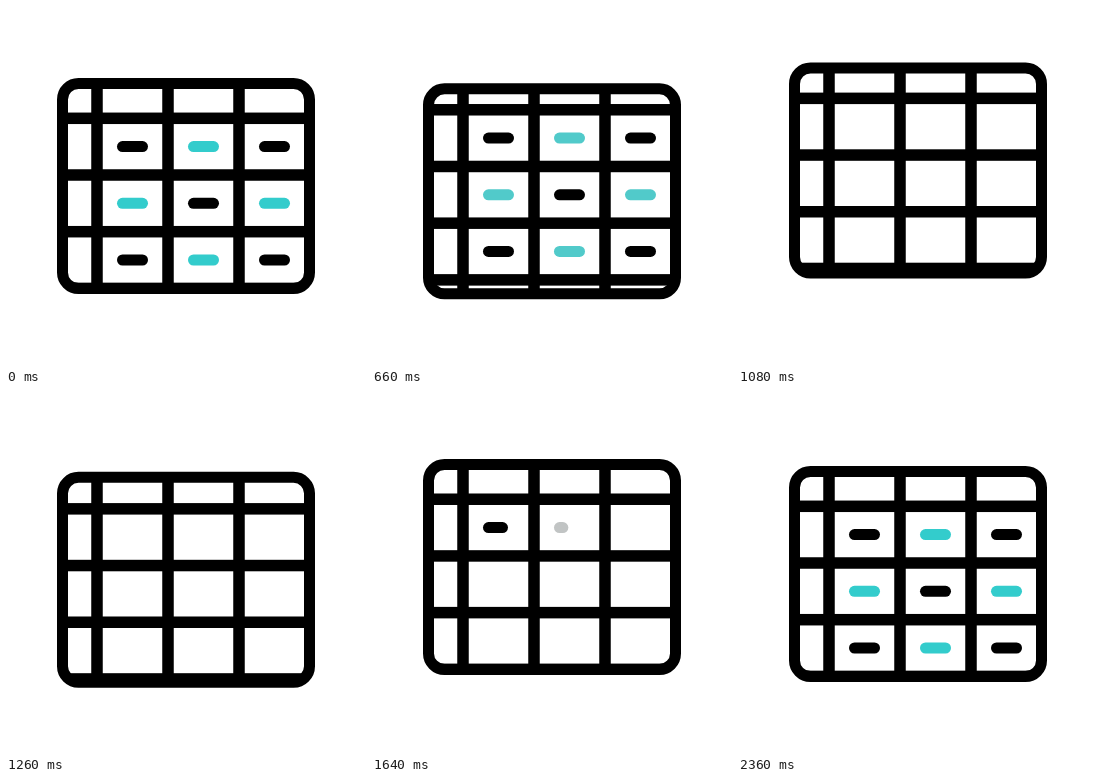
An HTML page with a canvas for the animation above (2.9 s loop, 360 px wide and 360 px high).

```html
<!DOCTYPE html>
<html lang="en">
<head>
<meta charset="utf-8">
<title>Scrolling table</title>
<style>
  html, body { margin: 0; width: 100%; height: 100%; overflow: hidden; background: #fff; }
  canvas { display: block; width: 360px; height: 360px; }
</style>
</head>
<body>
<canvas id="stage"></canvas>
<script>
const SIZE = 360, LOOP = 2900, STEP = 20;
const ROW = 56.7, LINE = 11.5;
const BOX = { x: 51, y: 72, w: 258, h: 216, r: 21.5, border: 11 };
const COLS = [91, 162, 233];
const DASH_X = [126.5, 197.5, 268.5];
const DASH_Y = 140.6, DASH_H = 11, DASH_CORE = 20;
const TEAL = [51, 204, 204], GREY = [193, 196, 196];

const canvas = document.getElementById('stage');
const ctx = canvas.getContext('2d');
const ratio = window.devicePixelRatio || 1;
canvas.width = canvas.height = SIZE * ratio;

const clamp = v => Math.max(0, Math.min(1, v));
const ease = u => (1 - Math.cos(Math.PI * u)) / 2;

// Keys are [time, value, skew]; skew > 1 delays the move into that key.
function track(keys, t) {
  if (t <= keys[0][0]) return keys[0][1];
  for (let i = 1; i < keys.length; i++) {
    const [t0, v0] = keys[i - 1], [t1, v1, skew = 1] = keys[i];
    if (t < t1) return v0 + (v1 - v0) * ease(Math.pow((t - t0) / (t1 - t0), skew));
  }
  return keys[keys.length - 1][1];
}

const BOUNCE = [[240, 0], [500, 6], [1030, -17, 1.85], [1380, 14], [1700, -9], [2000, 0]];
const SCROLL = [[220, 0], [500, 3.5], [1060, -4 * ROW - 4.5, 1.39], [1640, -4 * ROW]];

// Dashes are drawn in again one after another once the rows are empty.
const REDRAW = 1400, FIRST = 1535, STAGGER = 80, GROW = 150;

function tealAt(t) {
  const m = Math.min(clamp((t - 480) / 850), clamp((2360 - t) / 715));
  return `rgb(${TEAL.map((c, i) => Math.round(c + (GREY[i] - c) * m))})`;
}

function drawDashes(t, scroll) {
  const teal = tealAt(t);
  const fresh = t >= REDRAW;
  ctx.lineCap = 'round';
  ctx.lineWidth = DASH_H;
  for (let i = 0; i < 9; i++) {
    const grown = fresh ? (t - FIRST - i * STAGGER) / GROW : 1;
    if (grown <= 0) continue;
    const x = DASH_X[i % 3] - DASH_CORE / 2;
    const y = DASH_Y + Math.floor(i / 3) * ROW + (fresh ? scroll + 4 * ROW : scroll);
    ctx.strokeStyle = i % 2 ? teal : '#000';
    ctx.beginPath();
    ctx.moveTo(x, y);
    ctx.lineTo(x + DASH_CORE * clamp(grown), y);
    ctx.stroke();
  }
}

function drawGrid(scroll) {
  const { x, y, w, h } = BOX;
  ctx.fillStyle = '#000';
  for (const c of COLS) ctx.fillRect(c - LINE / 2, y, LINE, h);
  const shift = scroll % ROW;
  for (let i = -1; i < 5; i++) {
    ctx.fillRect(x, 112.3 + i * ROW + shift - LINE / 2, w, LINE);
  }
}

function render(t) {
  const { x, y, w, h, r, border } = BOX;
  const scroll = track(SCROLL, t);
  ctx.setTransform(ratio, 0, 0, ratio, 0, 0);
  ctx.fillStyle = '#fff';
  ctx.fillRect(0, 0, SIZE, SIZE);
  ctx.translate(0, track(BOUNCE, t));

  ctx.save();
  ctx.beginPath();
  ctx.roundRect(x + 1, y + 1, w - 2, h - 2, r - 1);
  ctx.clip();
  drawDashes(t, scroll);
  drawGrid(scroll);
  ctx.restore();

  ctx.strokeStyle = '#000';
  ctx.lineWidth = border;
  ctx.beginPath();
  ctx.roundRect(x + border / 2, y + border / 2, w - border, h - border, r - border / 2);
  ctx.stroke();
}

const start = performance.now();
function tick() {
  const t = (performance.now() - start) % LOOP;
  render(Math.floor(t / STEP) * STEP);
  requestAnimationFrame(tick);
}
tick();
</script>
</body>
</html>
```
